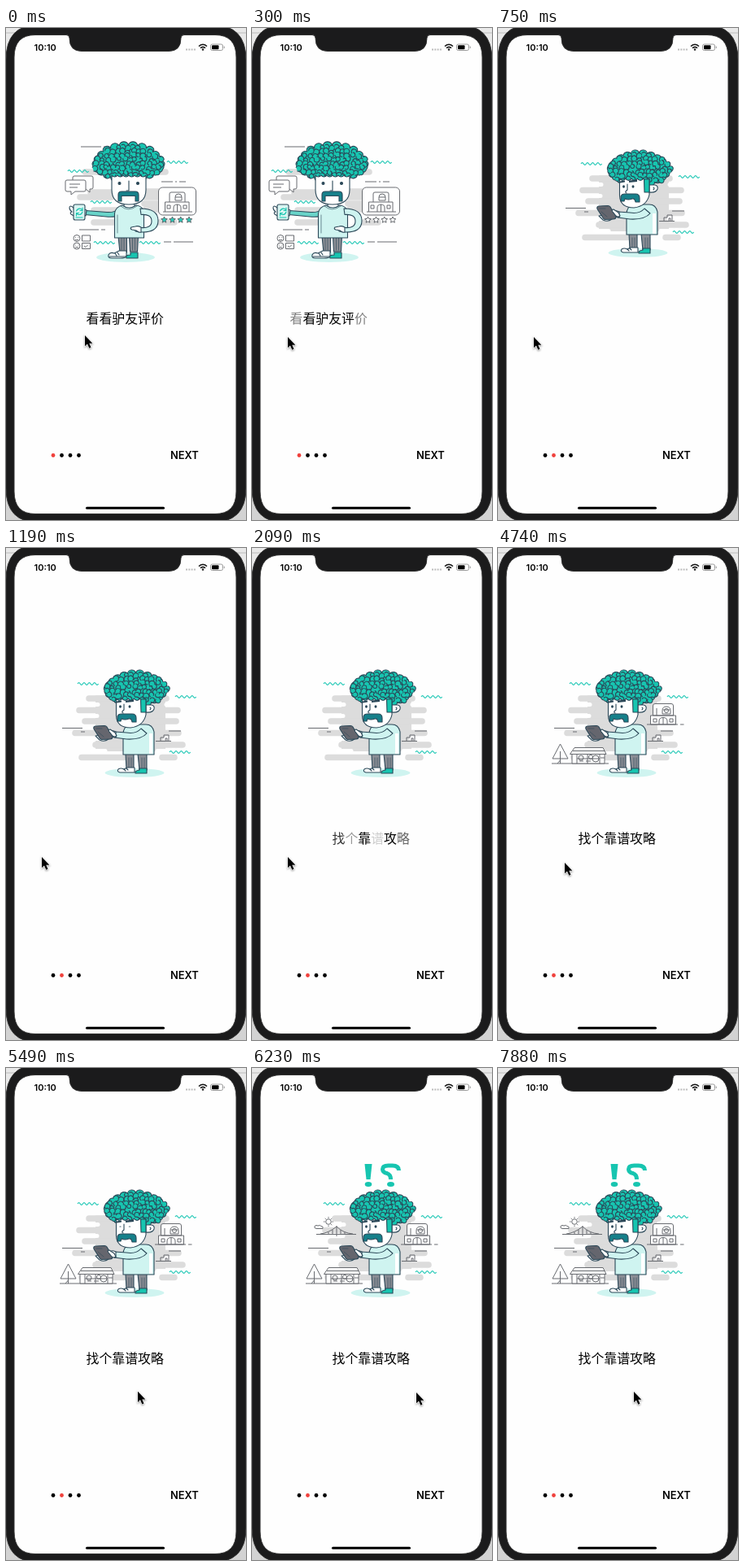
Animation of 295 by 605 pixels, one loop 8 s. Source, as an HTML page:

```html
<!DOCTYPE html>
<html lang="zh-CN">
<head>
<meta charset="utf-8">
<style>
html, body { margin: 0; width: 100%; height: 100%; overflow: hidden; background: linear-gradient(#e9e9e9, #d2d2d2); }
svg { display: block; }
.ui { font-family: Inter, Roboto, sans-serif; font-weight: 600; }
.title { font: 400 15.9px "Noto Sans CJK SC", "Noto Sans CJK", sans-serif; }
.ink { stroke: #2b4858; stroke-width: 1.1; stroke-linejoin: round; stroke-linecap: round; }
.line { fill: none; stroke: #686b70; stroke-width: 1; stroke-linejoin: round; }
.thin { stroke-width: .6; }
.wave { fill: none; stroke: #25c9b7; stroke-width: 1.2; }
.cloud { fill: none; stroke: #dcdcdc; stroke-width: 7.6; stroke-linecap: round; }
.gap { fill: none; stroke: #fff; stroke-width: 5; stroke-linecap: round; }
.none { fill: none; }
.shirt { fill: #cff4f0; }
.teal { fill: #17c5b0; }
.white { fill: #fff; }
.dark { fill: #2b4858; }
.tash { fill: #16808a; }
.grey { fill: #8b8e95; }
</style>
</head>
<body>
<svg width="295" height="605" viewBox="0 0 295 605">
  <path d="M0 6H295" stroke="#bbb"/>
  <rect x="10" y="8.500" width="273" height="589" fill="#fefefe"/>

  <svg x="10" y="9" width="273" height="588" viewBox="10 9 273 588">
    <g id="pages">
      <g id="first">
        <path class="cloud" d="M91 208H130M104 202H130M108 224H140M108 239H140M97 177H130M190 177H196M170 208H218M170 216H224M172 223H220M188 239H207M170 201H190"/>
        <ellipse cx="147" cy="282" rx="36" ry="6" class="shirt"/>
        <path class="line" d="M92 146H117M120 146H127M191 189H205M208 189H210M213 189H221M90 248H114M117 248H122M194 263H203M206 263H230"/>
        <g class="line">
          <path class="white" d="M84 182h21q2 0 2 2v12q0 2-2 2h-2v4l-5-4H84q-2 0-2-2v-12q0-2 2-2z"/>
          <path class="white" d="M75 187h21q2 0 2 2v10q0 2-2 2H85l-5 4v-4h-5q-2 0-2-2v-10q0-2 2-2z"/>
          <path d="M78 192H91M78 196H88"/>
          <circle cx="87" cy="258.500" r="4"/><circle cx="87" cy="268" r="4"/>
          <path d="M93.500 255h10v7h-10zM93.500 264.500h10v7h-10zM96 268l2 1.500 3-3M85 257.500h.8M88.500 257.500h.8M85 260.500q2 1 4-.5M85 267h.8M88.500 267h.8M85 270q2-1 4 0"/>
          <rect class="white" x="187.500" y="196" width="46" height="34" rx="5"/>
          <path d="M193 226H229M195.500 226V214H225V226M201 214V204q0-2 2-2h15q2 0 2 2V214M206 226v-5q0-4 4.500-4t4.500 4v5M210.500 217v9M198 218h4v4h-4zM218 218h4v4h-4z"/>
          <path d="M208 212v-4q0-4 4-4t4 4v4zM208 208H216"/>
        </g>
        <g id="stars" class="line"></g>
        <g class="ink">
          <path class="grey" d="M138 256H148.500V276H140zM151.500 256H162.500L161.500 275H152.500z"/>
          <path class="none thin" d="M142 258v15M145 258v15M155.500 258v15M158.500 258v15"/>
          <path class="white" d="M139 274h9v7q-1 2-8 2h-10q-5 0-4-4 2-4 7-2z"/>
          <path class="none" d="M127 281H147M134 277l2 3M137 276l2 3"/>
          <path class="teal" d="M153 276h9v7h-14q-2-4 5-4z"/>
          <path fill="#69d4c9" d="M137 223Q134 227 124 226.500L98 224.500 97 229.500 123 232Q134 233 140 230z"/>
          <path class="white" d="M99 224q-4-2-6 0v5l5 2zM83 221q-5-4-5 0 0 3 3 5-3 1-1 3l5 3z"/>
          <rect x="83" y="217" width="14" height="19" rx="2" fill="#d9f5f2"/>
          <g class="none" style="stroke:#17c5b0">
            <path d="M86.500 225q2-4 6-2.500l1.500 2M94 226q-1 4-5.500 3.500l-2-2M94 221v3.500h-3M86.500 231v-3.500h3M86 233H94"/>
          </g>
          <path class="white" d="M145 212V221q6 4 13 0v-9z"/>
          <path class="shirt" d="M143 218q8 6 17 0 8 1 9.500 8V258H133.500V228q1-8 9.500-10z"/>
          <path class="none thin" d="M141 219q9 8 20 0M137 230v22"/>
          <path class="shirt" fill-rule="evenodd" d="M165 222q22 0 22 15 0 15-22 14l-6-1v-5l7 .5q13 1 13-8 0-9-13-8z"/>
          <path class="white" d="M166 245q-4-2-7-1l-5 1q-2 2 1 3l5 1q3 3 6 2z"/>
          <g id="curls1"></g>
          <path class="white" d="M130 181V199Q130 217 151 217 172 217 172 199V181a4 4 0 0 1-7 0a4 4 0 0 1-7 0a4 4 0 0 1-7 0a4 4 0 0 1-7 0a4 4 0 0 1-7 0a4 4 0 0 1-7 0z"/>
          <path class="none" d="M151 188V200h-3"/>
          <path class="tash" d="M138 213V205q0-4 4-4h17q4 0 4 4v8h-4v-6.500h-17v6.500z"/>
          <circle class="dark" cx="139.500" cy="191" r="1.500"/><circle class="dark" cx="162" cy="191" r="1.500"/>
        </g>
        <text class="title" x="98.500" y="363">看看驴友评价</text>
      </g>

      <g transform="translate(272)">
        <g id="second">
          <path fill="#dcdcdc" d="M110 181.500H196V250H110z"/>
          <path class="cloud" d="M102 185H197M90 199.500H211M97 213H209M85 227.500H212M110 242H217M93 257.500H145M192 257.500H207"/>
          <path class="gap" d="M104 192.500H113M104 206.500H112M104 220.500H112M100 234.500H118M106 249.500H122M197 192.500H203M199 220H207M196 234.500H208M186 249.500H204"/>
          <ellipse cx="158" cy="276.500" rx="36.500" ry="5.500" class="shirt"/>
          <path class="line" d="M69 221.500H94M92 226H97M200 225H215M184 237.500H203M190 237v-4h4v-3h6v7M196 237v-3h2v3"/>
          <g id="house" class="line">
            <path class="white" d="M190.500 206V194q0-2.500 2.500-2.500H213q2.500 0 2.500 2.500V206zM187.500 206H218.500V217H187.500z"/>
            <path d="M183 217H221M224 217H228.500M198 217v-4q0-4.500 5-4.500t5 4.500v4M203 208.500V217M191 210h4v4h-4zM211 210h4v4h-4z"/>
            <path d="M202 204v-4q0-5 5-5t5 5v4zM195 206v-9M203 199H211"/><circle cx="207" cy="200" r="2.500"/>
          </g>
          <g id="hut" class="line">
            <path d="M66 265H136M76.500 241L67 259H86zM76.500 250V265M73 265l3.500-4"/>
            <path class="white" d="M94 245.500H129L133 253.500H88.500zM91 253.500H131V265H91z"/>
            <path d="M92 249.500H131M97 253v12M125 253v12M97 259H125M110 253v12"/>
            <circle cx="102" cy="258" r="3"/><circle cx="120" cy="259" r="4"/><circle cx="114" cy="257" r="2.500"/>
            <path d="M100 262h5M108 262h6M126 258h5"/>
          </g>
          <g id="bridge" class="line">
            <path d="M79 204.500H128M84 204q10-1 20-9 8 8 20 9M104 194V207M99 199v5M109 199v5M94 202v2M114 202v2"/>
            <circle cx="94" cy="189" r="3.300"/>
            <path d="M94 183v1.500M94 193.500V195M88 189h1.500M98.500 189h1.500M89.800 184.800l1 1M97.200 192.200l1 1M98.200 184.800l-1 1"/>
            <path class="white" d="M79 197.500q-3-.5-2-3 2-2 4-.5 3-1.500 4 .5 3 0 2 3z"/>
          </g>
          <g id="bang" class="teal">
            <path d="M138.500 118H147.500L145.500 137H140.500z"/><ellipse cx="143" cy="143" rx="4.300" ry="3"/>
            <path d="M180.500 126q0-6-8-6h-5q-7 0-7 4.500 0 4 5.500 5 4.500 1.500 4.500 7.500" fill="none" stroke="#17c5b0" stroke-width="5"/>
            <ellipse cx="170.500" cy="143" rx="4.500" ry="3"/>
          </g>
          <g class="ink">
            <path class="grey" d="M147 253H157V272H148zM162 253H173V273H164z"/>
            <path class="none thin" d="M151 258v13M154 258v13M167 258v13M170 258v13"/>
            <path class="white" d="M149 270h9v6H140q-4-1-2-4 3-2 7 0z"/>
            <path class="teal" d="M164 271h9v6h-14q-1-3 5-4z"/>
            <path class="none" d="M145 272l2 2M148 271l2 2"/>
            <path class="shirt" d="M152 217H172q8 0 10 9V254H144V229q0-9 8-12z"/>
            <path d="M176 228h4v25h-4z" fill="#fff" stroke="none"/>
            <g id="curls2"></g>
            <path class="white" d="M135.500 185V206Q136 221 153 221 169 219 172 205V185a4 4 0 0 1-7.300 0a4 4 0 0 1-7.300 0a4 4 0 0 1-7.300 0a4 4 0 0 1-7.300 0a4 4 0 0 1-7.300 0z"/>
            <path class="white" d="M172 193h7q4 1 3 5-2 5-10 4z"/>
            <path class="teal" d="M165.500 186h6.500v16h-6z"/>
            <path class="none" d="M177 196q2 1 0 3M145 192V199q-4 3-1 4"/>
            <path class="tash" d="M137 213V207q1-3 5-3h13q5 0 5 5v5h-5q-1-5-4-4-5 2-9 0l-1 3z"/>
            <g class="dark" stroke="none">
              <path d="M136 188.500l6-1v2l-6 1zM147 187.500l10-1v2.500l-10 1z"/>
              <ellipse class="eye" cx="140.500" cy="195" rx="1.500" ry="1.800"/><ellipse class="eye" cx="152" cy="195" rx="1.500" ry="1.800"/>
            </g>
            <path class="shirt" d="M166 222q-6 7-18 5l-14-1-1 7 15 2q18 1 25-7z"/>
            <path class="white" d="M135 226q-6-3-8 1l1 5 7 1zM110 231l5 5q6 3 11-1l-4-6z"/>
            <path fill="#65666e" d="M110 219l11-.5q2 0 3 1.500l7 12q0 3-3 3l-10 .5q-2 0-3-2l-7-11q-1-3 2-3.500z"/>
            <path class="none thin" d="M111 222l7 0M113 226l7 6"/>
            <path id="thumb" class="white" d="M134 227l-6-4q-3 0-1 3l4 5q3 2 5 0z"/>
          </g>
        </g>
        <text class="title" x="98.500" y="363">找个靠谱攻略</text>
      </g>
    </g>
  </svg>

  <g id="dots"></g>
  <text class="ui" x="202" y="530" font-size="12.900">NEXT</text>
  <rect x="98" y="588.700" width="97" height="3" rx="1.500"/>

  <path fill="#1b1b1c" stroke="#333" fill-rule="evenodd" d="M40-4H253q42 0 42 43V566q0 42-42 42H40Q0 608 0 566V39Q0-4 40-4z
    M36 8.500Q10 8.500 10 36V570q0 27.500 26 27.500H257q26 0 26-27.500V36q0-27.500-26-27.500H219q-4 0-4 4 0 16-15 16H93Q78 28.500 78 12.500q0-4-4-4z"/>
  <text class="ui" x="34.500" y="27.500" font-size="11">10:10</text>
  <path d="M221 26.500H233" stroke="#bbb" stroke-width="2" stroke-dasharray="2 1.300"/>
  <g fill="none" stroke="#111" stroke-width="1.600">
    <path d="M237 22.500q5-4.500 10 0M239 24.700q3-2.800 6 0"/><circle cx="242" cy="26.500" r=".5"/>
  </g>
  <rect x="251.500" y="20" width="15" height="7.500" rx="2" fill="#fff" stroke="#999"/>
  <rect x="253" y="21.300" width="8.500" height="5" rx="1"/>
  <path d="M268.300 22.500v2.500" stroke="#999"/>

  <path id="cursor" d="M0 0V13.200L3 10.400 5.300 15.700 7.500 14.700 5.300 9.700H9.400z" stroke="#fff" stroke-width="1.300" paint-order="stroke"
    style="filter:drop-shadow(0 1px 1px #0006)"/>
</svg>
<script>
const $ = id => document.getElementById(id);
const STEP = 148.4, LOOP = 8000, PAGE = 272;

function add(parent, tag, attrs) {
  const el = document.createElementNS('http://www.w3.org/2000/svg', tag);
  for (const name in attrs) el.setAttribute(name, attrs[name]);
  return parent.appendChild(el);
}

function wave(parent, x, y) {
  add(parent, 'path', { class: 'wave', d: `M${x} ${y}` + 'q1.600-2.800 3.200 0t3.200 0'.repeat(4) });
}

// A scalloped dome (widest at cy) covered with short open curls.
function hair(parent, cx, cy, rx, up, down) {
  let seed = 7;
  const rnd = () => (seed = seed * 16807 % 2147483647) / 2147483647;
  const bumps = 24;
  let d = '';
  for (let i = 0; i <= bumps; i++) {
    const a = i / bumps * 2 * Math.PI, s = Math.sin(a);
    const x = cx + rx * Math.cos(a), y = cy + s * (s < 0 ? up : down);
    d += (i ? `A5 4.500 0 0 1 ` : 'M') + `${x} ${y}`;
  }
  add(parent, 'path', { class: 'teal', d });
  for (let y = 2 - up; y < down; y += 5) {
    const half = rx * Math.sqrt(1 - (y / (y < 0 ? up : down)) ** 2);
    for (let x = 2 - half; x < half - 2; x += 6.500) {
      const r = 2.300 + rnd() * 1.200;
      add(parent, 'path', {
        class: 'teal',
        d: `M${-r} 0a${r} ${r} 0 0 1 ${2 * r} 0q0 ${r} ${-r} ${r}`,
        transform: `translate(${cx + x + rnd() * 3} ${cy + y + rnd() * 3 - 1}) rotate(${rnd() * 240 - 120})`
      });
    }
  }
}

const first = $('first'), second = $('second');
[[198, 165], [76, 176], [104, 214], [108, 264], [164, 264]].forEach(p => wave(first, ...p));
[[88, 167], [208, 183], [201, 251]].forEach(p => wave(second, ...p));
hair($('curls1'), 150.500, 170, 43.500, 25.500, 15);
hair($('curls2'), 159.500, 175, 38.500, 21, 17);

for (const x of [194.500, 204.500, 214.700, 225]) {
  let d = '';
  for (let i = 0; i < 10; i++) {
    const r = i % 2 ? 1.900 : 4, a = i * Math.PI / 5;
    d += `${i ? 'L' : 'M'}${x + r * Math.sin(a)} ${236 - r * Math.cos(a)}`;
  }
  add($('stars'), 'path', { d: d + 'z' });
}

const dots = [0, 1, 2, 3].map(i => add($('dots'), 'circle', { cx: 58 + i * 10.500, cy: 525.500, r: 2.400 }));
const [words1, words2] = [...document.querySelectorAll('.title')].map(text => {
  const chars = [...text.textContent];
  text.textContent = '';
  return chars.map(c => {
    const span = add(text, 'tspan', {});
    span.textContent = c;
    return span;
  });
});

// Piecewise linear lookup in rows of [step, value, ...].
function track(rows, k, col = 1) {
  const i = rows.findIndex(r => r[0] > k);
  if (i < 0) return rows[rows.length - 1][col];
  const a = rows[i - 1], b = rows[i];
  return a[col] + (b[col] - a[col]) * (k - a[0]) / (b[0] - a[0]);
}
const ramp = (k, from, to) => Math.min(1, Math.max(0, (k - from) / (to - from)));

const mouse = [[0, 97, 378], [2, 44, 380], [31, 44, 380], [32, 82, 387], [39, 194, 402], [42, 202, 399],
  [49, 202, 399], [50, 208, 398], [51, 203, 398], [53, 167, 398]];
const scroll = [[0, 0], [2, 52], [3, 52], [4, 190], [5, 258], [6, 270], [7, 270], [8, PAGE]];
const delays = [2, 4, 0, 5, 1, 3];
const blinks = [20, 24, 28, 35, 37];
const eyes = document.querySelectorAll('.eye');

function draw(now) {
  const k = Math.floor(now % LOOP / STEP + .1);
  const x = track(scroll, k);
  $('pages').setAttribute('transform', `translate(${-x})`);
  $('cursor').setAttribute('transform', `translate(${track(mouse, k)} ${track(mouse, k, 2)})`);
  dots.forEach((dot, i) => dot.setAttribute('fill', i === (x > PAGE / 2 ? 1 : 0) ? '#f0413c' : '#000'));
  $('stars').style.fill = k < 2 ? '#25c9b7' : '#fff';

  words1.forEach((w, i) => w.setAttribute('fill-opacity', i % 5 ? 1 : 1 - ramp(k, 0, 2) / 2));
  words2.forEach((w, i) => w.setAttribute('fill-opacity', ramp(k, 8 + delays[i], 13 + delays[i])));

  $('house').setAttribute('opacity', ramp(k, 14, 18));
  $('hut').setAttribute('opacity', ramp(k, 26, 29));
  $('bridge').setAttribute('opacity', ramp(k, 39, 42));
  $('bang').setAttribute('opacity', ramp(k, 39, 42));

  eyes.forEach(eye => eye.setAttribute('ry', blinks.includes(k) ? .4 : 1.800));
  const tap = k > 20 && k < 40 && k % 2;
  $('thumb').setAttribute('transform', tap ? 'translate(-1 1)' : '');
  requestAnimationFrame(() => draw(performance.now()));
}
draw(performance.now());
</script>
</body>
</html>
```
